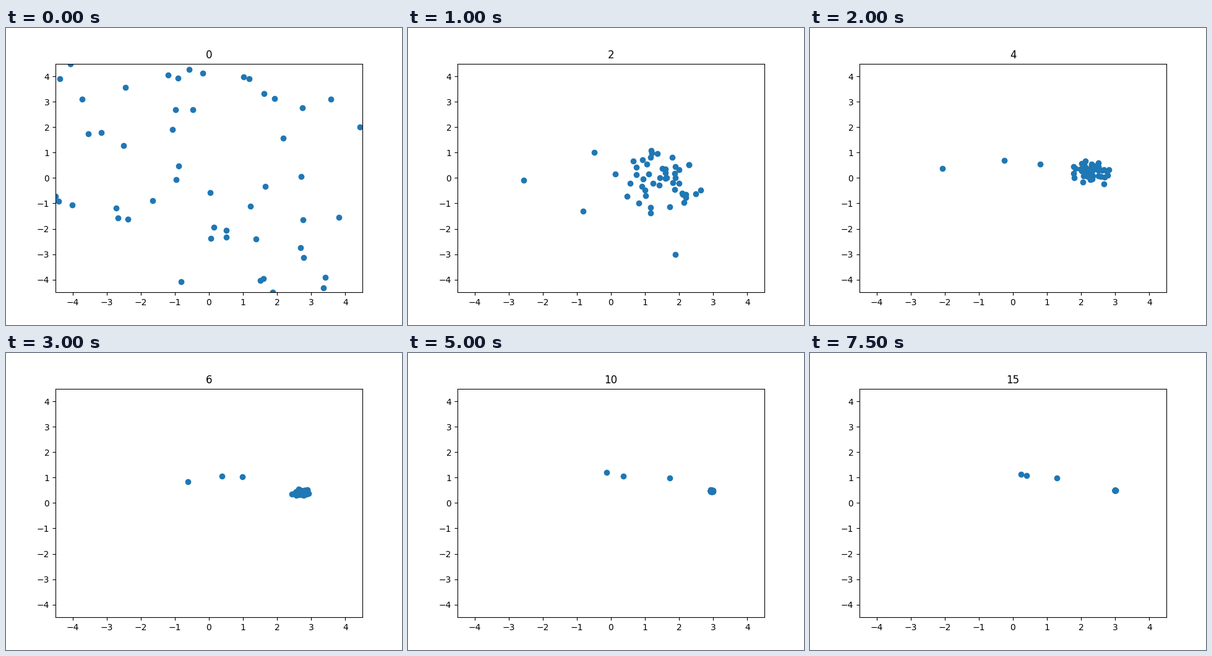
These frames come from a looping animation (640x480 px, 8000 ms). A matplotlib script:

```python
import numpy as np
import matplotlib.pyplot as plt
from matplotlib.animation import FuncAnimation

GENS = 16
SWARM = 47
LIMIT = 4.5
GOAL = np.array([3.0, 0.5])       # minimum of the Beale function
LAG = np.array([-1.32, -0.61])    # swarm centre minus goal at generation 2
JITTER = np.array([0.5, 0.28])    # spread of the swarm at generation 2

# Three stragglers wander between a few key points.
KEYS = [0, 2, 4, 6, 8, 12, 15]
PATHS = [
    [(-4.41, -0.91), (-2.56, -0.09), (-2.07, 0.38), (-0.62, 0.84),
     (-0.65, 0.93), (0.38, 1.49), (0.24, 1.13)],
    [(-2.72, -1.18), (-0.82, -1.31), (-0.25, 0.69), (0.38, 1.06),
     (0.09, 1.15), (0.62, 0.94), (0.40, 1.08)],
    [(1.51, -4.03), (1.89, -3.01), (0.80, 0.55), (0.98, 1.03),
     (0.96, 0.81), (2.49, 1.15), (1.29, 0.98)],
]

START = np.random.default_rng(5).uniform(-LIMIT, LIMIT, (SWARM, 2))


def stragglers(gen):
    return [[np.interp(gen, KEYS, axis) for axis in zip(*path)]
            for path in PATHS]


def swarm(gen):
    """Close in on the goal while the starting spread fades away."""
    if gen == 0:
        return START
    noise = np.random.default_rng(gen).normal(size=START.shape)
    centre = GOAL + LAG * 0.65 ** (gen - 2)
    return (centre + (START - centre) * 0.45 ** gen
            + JITTER * noise * 0.7 ** (gen - 2))


def population(gen):
    return np.vstack([stragglers(gen), swarm(gen)])


fig, ax = plt.subplots(figsize=(6.4, 4.8), dpi=100)
ax.set(xlim=(-LIMIT, LIMIT), ylim=(-LIMIT, LIMIT),
       xticks=range(-4, 5), yticks=range(-4, 5))
dots = ax.scatter(*population(0).T, color="tab:blue")
title = ax.set_title("0")


def update(gen):
    dots.set_offsets(population(gen))
    title.set_text(str(gen))
    return dots, title


anim = FuncAnimation(fig, update, frames=GENS, interval=500,
                     repeat=True, repeat_delay=0)
plt.show()
```
